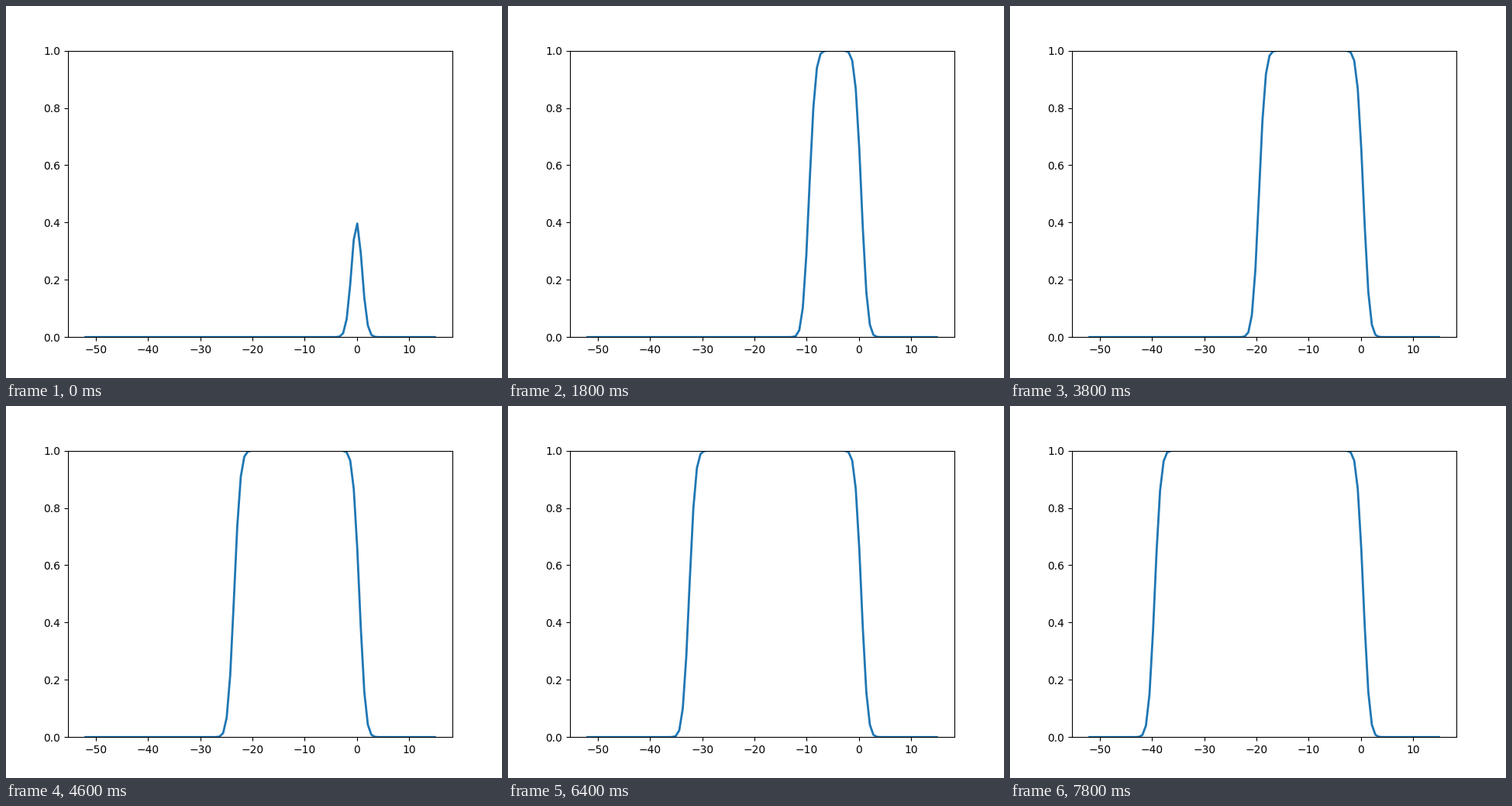
A matplotlib script for the animation above (8000 ms loop, 640x480 px).

```python
import numpy as np
import matplotlib.pyplot as plt
from matplotlib.animation import FuncAnimation

FRAMES = 40
INTERVAL = 200  # ms

x = np.linspace(-52, 15, 100)


def normal_pdf(x, mu):
    return np.exp(-0.5 * (x - mu) ** 2) / np.sqrt(2 * np.pi)


def bell_sum(n):
    """Sum of unit normals centred at 0, -1, ..., -n."""
    centres = -np.arange(n + 1)
    return normal_pdf(x[:, None], centres).sum(axis=1)


fig, ax = plt.subplots(figsize=(6.4, 4.8), dpi=100)
line, = ax.plot(x, bell_sum(0), color="#1f77b4", lw=2)
ax.set_ylim(0, 1)


def update(i):
    line.set_ydata(bell_sum(i))
    return line,


anim = FuncAnimation(fig, update, frames=FRAMES, interval=INTERVAL,
                     repeat=True, repeat_delay=0)
plt.show()
```
